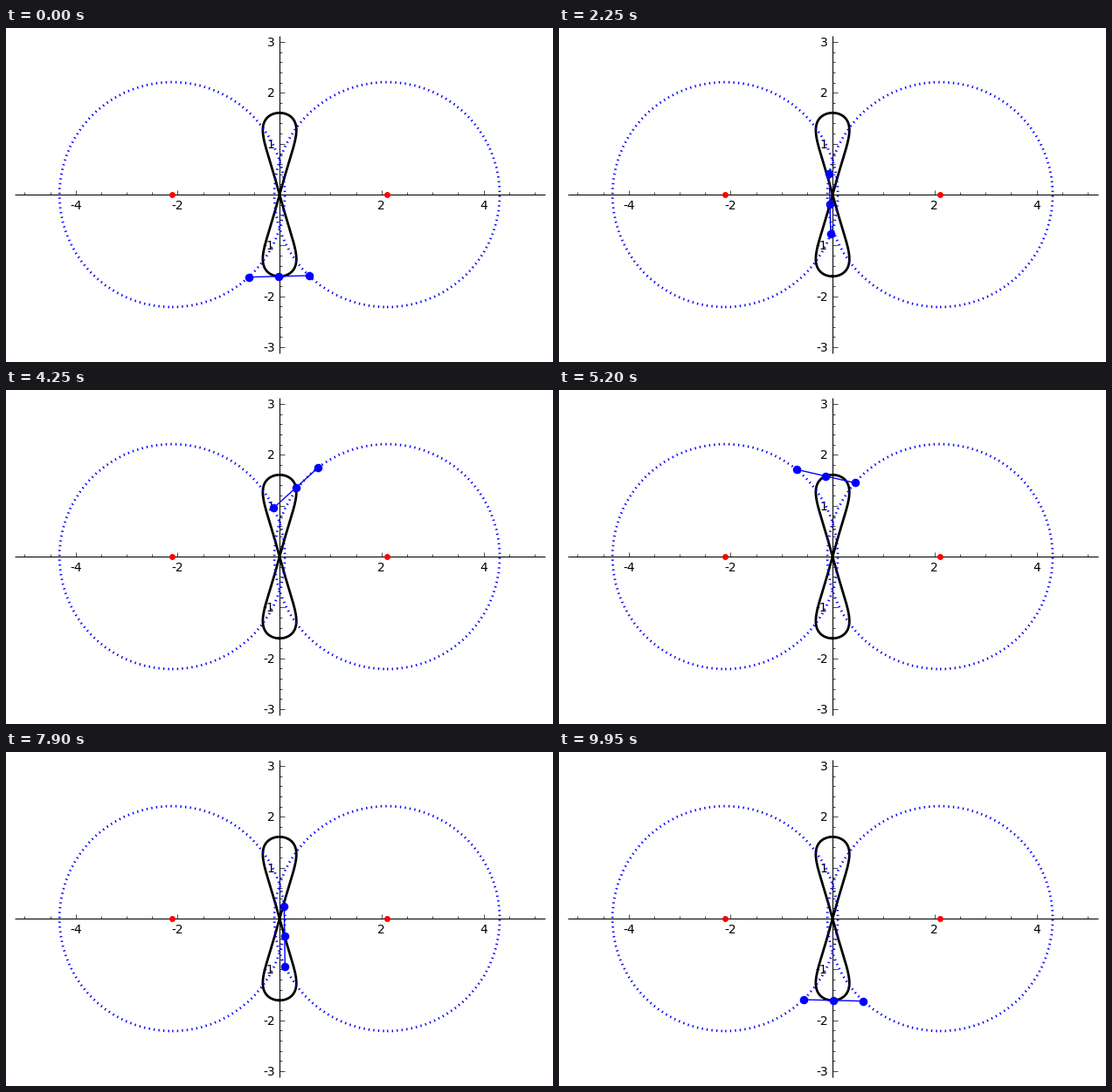
A matplotlib script that plays this animation: 626x383 px, repeating every 10000 ms.

```python
import numpy as np
import matplotlib.pyplot as plt
from matplotlib.animation import FuncAnimation
from matplotlib.patches import Circle

W, H, DPI = 626, 383, 100
SCALE = 58.35            # pixels per unit
OX, OY = 313.1, 191.05   # origin in pixels from the top left
A, B, C = 2.107, 2.21, 0.59  # half centre distance, arm length, half rod
FRAMES, INTERVAL = 200, 50


def follower(lead):
    """Angle of the second arm for a given angle of the leading arm."""
    x, y = 2 * A - B * np.cos(lead), B * np.sin(lead)
    d = np.hypot(x, y)
    return np.arctan2(y, x) + np.arccos((d**2 + B**2 - 4 * C**2) / (2 * d * B))


def arm_angles(per_quarter):
    """Left and right arm angles over one loop, at even steps of arm travel."""
    top = np.arccos((A - C) / B)
    cross = np.arccos((A**2 + B**2 - C**2) / (2 * A * B))
    lead = np.linspace(top, -cross, 4000)
    follow = follower(lead)
    travel = np.append(0, np.cumsum(np.hypot(np.diff(lead), np.diff(follow))))
    at = (np.arange(per_quarter) + 0.5) / per_quarter * travel[-1]
    p = np.interp(at, travel, lead)
    q = np.interp(at, travel, follow)
    left = np.concatenate([-q, p[::-1], q, -p[::-1]])
    right = np.concatenate([-p, q[::-1], p, -q[::-1]])
    return left, right


def rod_points(per_quarter):
    """Left end, middle and right end: arrays of x and y, shape (n, 3)."""
    left, right = arm_angles(per_quarter)
    xl, yl = -A + B * np.cos(left), B * np.sin(left)
    xr, yr = A - B * np.cos(right), B * np.sin(right)
    return (np.stack([xl, (xl + xr) / 2, xr], 1),
            np.stack([yl, (yl + yr) / 2, yr], 1))


fig = plt.figure(figsize=(W / DPI, H / DPI), dpi=DPI, facecolor="white")
ax = fig.add_axes([0, 0, 1, 1])
ax.set_xlim(-OX / SCALE, (W - OX) / SCALE)
ax.set_ylim((OY - H) / SCALE, OY / SCALE)
ax.axis("off")


def stroke(x, y, width):
    ax.plot(x, y, color="black", lw=width, solid_capstyle="butt",
            snap=True, zorder=1)


def label(value, x, y, dx, dy, ha):
    ax.annotate(str(value), (x, y), (dx, dy), textcoords="offset pixels",
                ha=ha, va="baseline", fontsize=10, family="DejaVu Sans",
                zorder=1)


# axes and ticks
stroke([-5.2, 5.2], [0, 0], 0.75)
stroke([0, 0], [-3.12, 3.12], 0.75)
MAJOR, MINOR = 5.5 / SCALE, 2.8 / SCALE
for i in range(-10, 11):
    stroke([i / 2] * 2, [0, MINOR if i % 4 else MAJOR], 0.5)
for i in range(-15, 16):
    stroke([0, MINOR if i % 5 else MAJOR], [i / 5] * 2, 0.5)
for v in (-4, -2, 2, 4):
    label(v, v, 0, 0, -17, "center")
for v in (-3, -2, -1, 1, 2, 3):
    label(v, 0, v, -5.5, -5, "right")

# traced curve
cx, cy = (p[:, 1] for p in rod_points(400))
ax.plot(np.append(cx, cx[0]), np.append(cy, cy[0]), color="black", lw=2,
        zorder=2)

# arm circles and their centres
for x in (-A, A):
    ax.add_patch(Circle((x, 0), B, fill=False, ec="blue", lw=2,
                        ls=(0, (0.5, 1.5)), capstyle="butt", zorder=4))
    ax.plot(x, 0, "o", color="red", ms=5, mew=0, zorder=5)

rod, = ax.plot([], [], color="blue", lw=1, zorder=3)
joints, = ax.plot([], [], "o", color="blue", ms=6.9, mew=0, zorder=6)
xs, ys = rod_points(FRAMES // 4)


def draw(k):
    for part in (rod, joints):
        part.set_data(xs[k], ys[k])
    return rod, joints


anim = FuncAnimation(fig, draw, frames=FRAMES, interval=INTERVAL,
                     repeat=True, repeat_delay=0)
plt.show()
```
